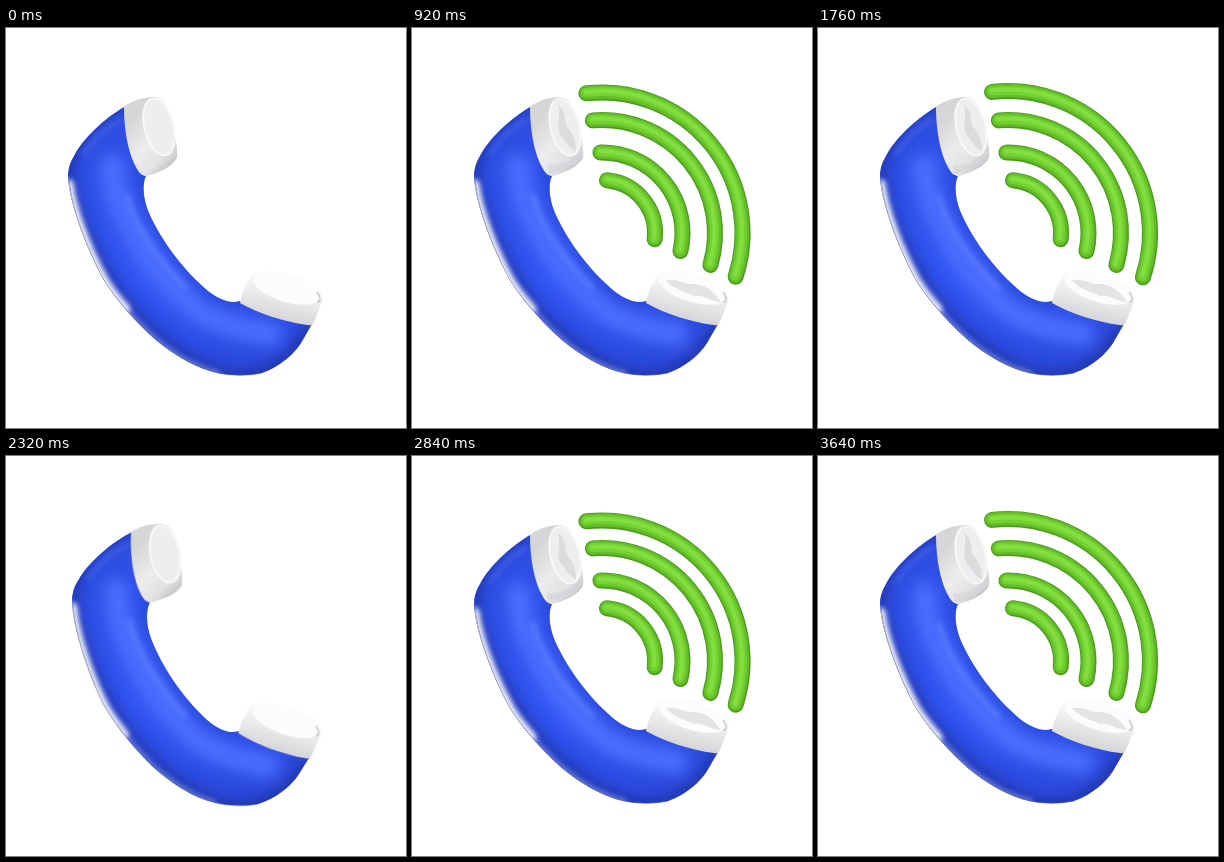
Recreate the animation shown at these times as an HTML page. Size 400 by 400 pixels, loop 3.84 s.

```html
<!DOCTYPE html>
<html lang="en">
<head>
<meta charset="utf-8">
<title>Ringing phone</title>
<style>
  html, body { margin: 0; width: 100%; height: 100%; overflow: hidden; background: #fff; }
  svg { display: block; width: 100vw; height: 100vh; }
  .wave path { fill: none; stroke-linecap: round; }
</style>
</head>
<body>
<svg viewBox="0 0 400 400">
  <defs>
    <linearGradient id="blue" x1="80" y1="90" x2="270" y2="350" gradientUnits="userSpaceOnUse">
      <stop offset="0" stop-color="#2e4de0"/>
      <stop offset=".5" stop-color="#3154f2"/>
      <stop offset="1" stop-color="#2b48da"/>
    </linearGradient>
    <linearGradient id="capTop" x1="118" y1="100" x2="164" y2="144" gradientUnits="userSpaceOnUse">
      <stop offset="0" stop-color="#d6d6d8"/>
      <stop offset=".45" stop-color="#ececed"/>
      <stop offset=".75" stop-color="#e2e2e4"/>
      <stop offset="1" stop-color="#bcbcc0"/>
    </linearGradient>
    <linearGradient id="capRight" x1="270" y1="246" x2="260" y2="292" gradientUnits="userSpaceOnUse">
      <stop offset="0" stop-color="#fdfdfd"/>
      <stop offset=".45" stop-color="#ececed"/>
      <stop offset="1" stop-color="#d2d2d5"/>
    </linearGradient>
    <filter id="soft" x="-30%" y="-30%" width="160%" height="160%"><feGaussianBlur stdDeviation="7"/></filter>
    <filter id="fine" x="-30%" y="-30%" width="160%" height="160%"><feGaussianBlur stdDeviation="2.5"/></filter>
    <path id="body" d="M120 78C98 90 76 112 68 128C62 138 61 146 63 158C66 180 80 219 98 252C112 274 130 294 150 312C168 327 192 341 212 345C226 348 242 348 256 345C275 338 288 326 295 315L306 296L234 273C224 276 214 272 202 263C175 240 154 210 143 185C137 171 136 156 140 148L136 145Z"/>
    <clipPath id="inside"><use href="#body"/></clipPath>
  </defs>

  <g id="phone">
    <use href="#body" fill="url(#blue)"/>
    <g clip-path="url(#inside)" fill="none" stroke-linecap="round">
      <g filter="url(#soft)">
        <path d="M116 74C70 105 58 128 64 160C76 206 98 246 130 286C162 320 200 347 236 348C270 346 285 330 308 298" stroke="#1e2f9c" stroke-width="9"/>
        <path d="M136 143C134 178 160 220 190 254C207 270 219 279 236 273" stroke="#2440d0" stroke-width="6"/>
        <path d="M106 138C108 185 148 250 196 286C220 298 240 302 264 306" stroke="#4a6dff" stroke-width="24"/>
      </g>
      <g filter="url(#fine)">
        <path d="M121 168C128 198 152 232 180 260" stroke="#6482ff" stroke-width="5" opacity=".7"/>
        <path d="M78 126C88 110 101 99 114 92" stroke="#5270f4" stroke-width="4" opacity=".6"/>
        <path d="M98 252C112 274 130 294 150 312C168 327 192 341 212 345" stroke="#8d9be4" stroke-width="5" opacity=".7"/>
        <path d="M63 156C66 180 80 219 98 252C104 262 112 272 120 281" stroke="#eceef8" stroke-width="9"/>
      </g>
      <path d="M63 152C66 180 80 219 98 252C105 263 112 272 120 281C100 258 74 214 63 152Z" fill="#fff"/>
    </g>
    <path d="M63 152C66 180 80 219 98 252C112 274 130 294 150 312C168 327 192 341 212 345C226 348 242 348 256 345" fill="none" stroke="#62667c" stroke-width=".8" opacity=".7"/>

    <path d="M118 79C124 73 138 69 148 69C158 70 162 79 166 95C169 107 172 120 171 129C168 138 153 145 140 148C137 148 134 146 131 141C122 126 118 102 118 79Z" fill="url(#capTop)"/>
    <ellipse cx="153" cy="99" rx="14.5" ry="29" transform="rotate(-14 153 99)" fill="#eeeef1" stroke="#f8f8f9" stroke-width="2"/>
    <path d="M234 275C236 264 241 253 247 246C257 241 284 245 300 252C312 258 318 266 316 274L308 294Q306 298 302 297C278 294 254 286 234 275Z" fill="url(#capRight)"/>
    <ellipse cx="281" cy="260" rx="35" ry="14" transform="rotate(17 281 260)" fill="#fcfcfc"/>
    <path d="M311 274C315 274 315 269 311 264" fill="none" stroke="#c9c9cd" stroke-width="1.5"/>
    <g id="reflection" fill="#d5d6d9">
      <path d="M146 77C156 84 151 94 156 100C162 106 164 116 164 123C156 120 154 112 149 108C143 98 150 90 146 77Z" opacity=".75"/>
      <path d="M135 137C147 138 160 133 170 126C169 136 151 143 137 146Z" opacity=".7"/>
      <path d="M254 252C268 250 272 257 282 256C296 257 304 266 309 274C298 274 292 266 282 268C274 264 262 262 254 252Z" opacity=".6"/>
    </g>
  </g>
  <g id="waves"></g>
</svg>

<script>
const LOOP = 3840, SHAKE = 110, TILT = 2.5;
const RINGS = [[0, 960], [1080, 1760], [2160, 2880], [3000, 3640]]; // start, fully open
const RADII = [142, 113, 80.5, 53], BIRTH_RADIUS = 50, POP = 60;
const CX = 190, CY = 205;
// colour, width, x and y offset
const LAYERS = [['#4a9a1e', 16, 0, 0], ['#63bd27', 13.5, -.2, -.4], ['#74d132', 9, -.4, -.8], ['#82df3f', 4, -.6, -1.4]];

const phone = document.getElementById('phone');
const reflection = document.getElementById('reflection');
const clamp = x => Math.min(1, Math.max(0, x));
const ease = x => (1 - Math.cos(Math.PI * clamp(x))) / 2;

function make(parent, tag, attributes) {
  const node = document.createElementNS('http://www.w3.org/2000/svg', tag);
  for (const name in attributes) node.setAttribute(name, attributes[name]);
  return parent.appendChild(node);
}

const waves = RADII.map(radius => {
  const group = make(document.getElementById('waves'), 'g', { class: 'wave' });
  const paths = LAYERS.map(([stroke, , x, y]) =>
    make(group, 'path', { stroke, transform: `translate(${x} ${y})` }));
  return { radius, group, paths };
});

function arc(r) {
  const point = degrees => {
    const a = degrees * Math.PI / 180;
    return `${CX + r * Math.cos(a)} ${CY + r * Math.sin(a)}`;
  };
  return `M${point(-103.5 + 1000 / r)}A${r} ${r} 0 0 1 ${point(25 - 970 / r)}`;
}

// Each wave pops up near the phone, then widens to its own radius.
function drawWave({ radius, group, paths }, i, time) {
  const age = time + 488 - 62 * i;
  const pop = clamp((age + POP) / POP);
  const r = BIRTH_RADIUS + (radius - BIRTH_RADIUS) * ease(age / (488 - 110 * i));
  group.setAttribute('visibility', pop > 0 ? 'visible' : 'hidden');
  group.setAttribute('transform', `translate(196 204) scale(${pop}) translate(-196 -204)`);
  paths.forEach((path, k) => {
    path.setAttribute('d', arc(r));
    path.setAttribute('stroke-width', LAYERS[k][1] * pop);
  });
}

function draw(now) {
  const t = now % LOOP;
  const [start, full] = RINGS.findLast(ring => t >= ring[0]);
  const elapsed = t - start;
  const shakeTime = Math.floor((full - start) / SHAKE) * SHAKE;
  const swing = elapsed < shakeTime ? (1 - Math.cos(2 * Math.PI * elapsed / SHAKE)) / 2 : 0;
  phone.setAttribute('transform', `rotate(${TILT * swing} 180 240)`);
  reflection.setAttribute('opacity', ease((t - full + 380) / 300));
  waves.forEach((wave, i) => drawWave(wave, i, t - full));
}

const origin = performance.now();
function tick() {
  draw(Math.max(0, performance.now() - origin));
  requestAnimationFrame(tick);
}
tick();
</script>
</body>
</html>
```
